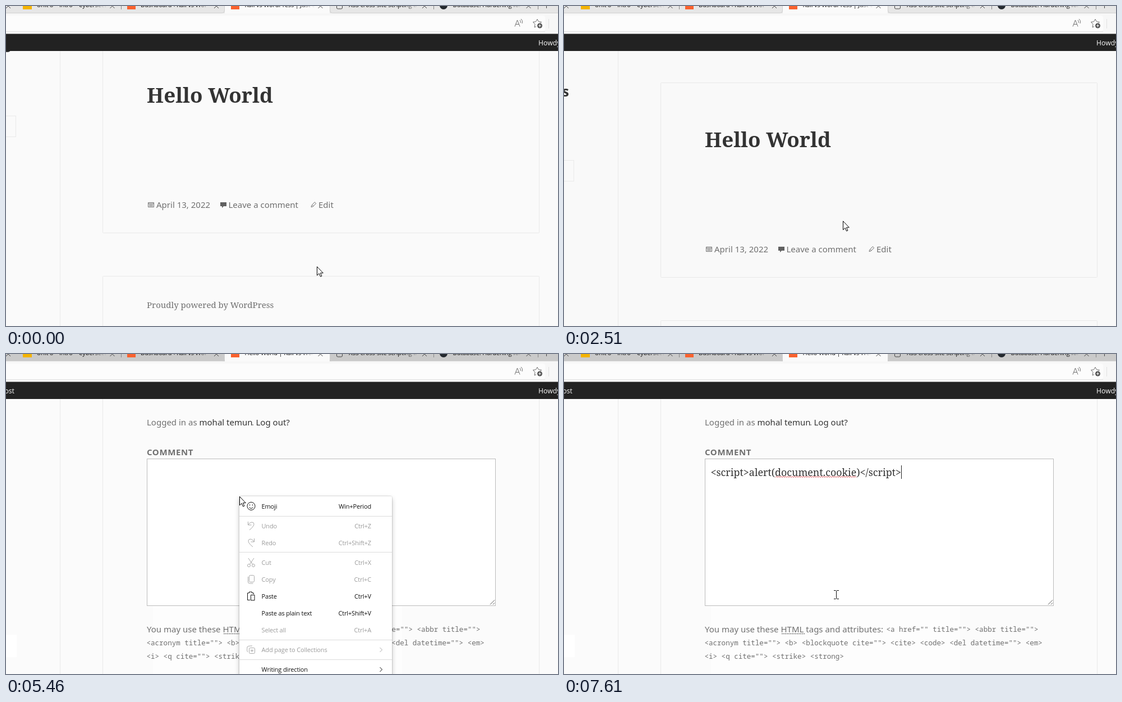
Write an HTML page that moves like this. It is 984 by 569 pixels and loops after 8000 ms.

```html
<!DOCTYPE html>
<html lang="en">
<head>
<meta charset="utf-8">
<title>Comment form</title>
<style>
  html, body { margin: 0; width: 100%; height: 100%; overflow: hidden; background: #fafafa; }
  svg { display: block; width: 984px; height: 569px; --paper: #fafafa; --tab: #e6e6e6; --rule: #e9e9e9; }
  text { white-space: pre; }
  .paper { fill: var(--paper); }
  .tab { fill: var(--tab); }
  .rule { fill: none; stroke: var(--rule); }
  .sans { font: 15px "Noto Sans", sans-serif; fill: #707070; }
  .serif { font: 15px "Noto Serif", serif; fill: #707070; }
  .mono { font: 12.56px "Noto Sans Mono", monospace; fill: #707070; }
  .title { font: bold 36.8px "Noto Serif", serif; fill: #333; }
  .site { font: bold 25px "Noto Sans", sans-serif; fill: #333; }
  .label { font-weight: bold; letter-spacing: .04em; }
  .link { fill: #333; }
  .typed { font: 17.9px "Noto Serif", serif; fill: #333; }
  .bar { font: 12.2px "Noto Sans", sans-serif; fill: #eee; }
  .ui { font: 11px "Open Sans", sans-serif; letter-spacing: -.15px; fill: #111; }
  .off { fill: #9c9c9c; }
  .line { fill: none; stroke: #444; }
  .dark { fill: none; stroke: #111; }
  .mid { fill: none; stroke: #707070; }
  .pale { fill: none; stroke: #aaa; }
  .pointer { fill: #fff; stroke: #000; stroke-linejoin: round; }
</style>
</head>
<body>
<svg viewBox="0 0 984 569">
  <defs>
    <linearGradient id="fade">
      <stop stop-color="var(--tab)" stop-opacity="0"/>
      <stop offset="1" stop-color="var(--tab)"/>
    </linearGradient>
    <linearGradient id="fadeActive">
      <stop stop-color="#fafafa" stop-opacity="0"/>
      <stop offset="1" stop-color="#fafafa"/>
    </linearGradient>
    <filter id="shadow" x="-10%" y="-10%" width="120%" height="120%">
      <feDropShadow dx="0" dy="0" stdDeviation="1" flood-opacity=".3"/>
      <feDropShadow dx="0" dy="4" stdDeviation="4" flood-opacity=".22"/>
    </filter>
  </defs>

  <rect class="paper" width="984" height="569"/>

  <g id="shade">
    <path fill="#fff" d="M0 80h96v420H0z"/>
    <path fill="#f1f1f1" d="M97 80h854v420H97z"/>
    <path fill="#fff" d="M173 80h778v21H173z"/>
    <path fill="#f7f7f7" d="M173 101h778v288H173z"/>
  </g>
  <g id="tail">
    <rect width="96" fill="#fff"/>
    <rect x="97" width="854" fill="#f1f1f1"/>
  </g>
  <path class="rule" d="M96.5 80V569"/>

  <g id="posts">
    <text class="site" x="9" y="82" text-anchor="end">s</text>
    <rect class="rule" x="-20.5" y="195.5" width="38" height="37"/>
    <rect class="rule" x="172.5" y="57.5" width="778" height="346" rx="1"/>
    <rect class="rule" x="172.5" y="480.5" width="778" height="101" rx="1"/>
    <text class="title" x="251" y="172">Hello World</text>
    <g class="mid">
      <path d="M253.5 349.5h10v8h-10zM253 351.5h11M255 353.5h7M255 355.5h7"/>
      <path d="M544 357.5l.8-3 5.5-5.8 2.4 2.3-5.6 5.7zM546 354l2 2"/>
      <path d="M382 349h11v7h-5l-3 3v-3h-3z" fill="#606060" stroke="none"/>
    </g>
    <text class="sans" y="359"><tspan x="268">April 13, 2022</tspan><tspan x="396.5">Leave a comment</tspan><tspan x="557">Edit</tspan></text>
    <text class="serif" x="251" y="537">Proudly powered by WordPress</text>
  </g>

  <g id="form">
    <path class="rule" d="M172.5 60V569M950.5 60V569"/>
    <path class="rule" d="M0 500.5H18M0 538.5H18"/>
    <rect id="search" y="499" width="19" height="40" fill="#fff"/>
    <rect id="patch" x="262" y="448" width="444" height="121" fill="#fdfdfd"/>
    <text class="sans" y="127"><tspan x="251">Logged in as </tspan><tspan class="link">mohal temun</tspan><tspan x="438">. </tspan><tspan class="link" x="445.5">Log out?</tspan></text>
    <text class="sans label" x="251" y="180">COMMENT</text>
    <rect id="area" x="251.5" y="186.5" width="621" height="261"/>
    <path class="line" d="M863 445.5l8-8M868 445.5l3-3" stroke-width=".9"/>
    <text class="sans" x="251" y="495">You may use these HTML tags and attributes:</text>
    <path class="line" d="M388 497.5h41" stroke-dasharray="2 1"/>
    <text class="mono"><tspan x="574.5" y="494">&lt;a href="" title=""&gt; &lt;abbr title=""&gt;</tspan><tspan x="250.5" y="518">&lt;acronym title=""&gt; &lt;b&gt; &lt;blockquote cite=""&gt; &lt;cite&gt; &lt;code&gt; &lt;del datetime=""&gt; &lt;em&gt;</tspan><tspan x="250.5" y="541.5">&lt;i&gt; &lt;q cite=""&gt; &lt;strike&gt; &lt;strong&gt;</tspan></text>
    <g id="typed">
      <text class="typed" x="261.5" y="217">&lt;script&gt;alert(document.cookie)&lt;/script&gt;</text>
      <path id="squiggle" fill="none" stroke="#e0494d"/>
    </g>
    <rect id="caret" y="198" width="1" height="24" fill="#222"/>
  </g>

  <g id="menu">
    <rect x="416" y="253" width="272" height="340" rx="3" fill="#fff" filter="url(#shadow)"/>
    <path d="M416 288.5h272M416 352.5h272M416 508.5h272M416 543.5h272" stroke="#dcdcdc"/>
    <g class="dark">
      <circle cx="437" cy="270.5" r="7"/>
      <path d="M433.5 272.5q3.5 4 7 0M434.5 267.5v2M439.5 267.5v2"/>
      <path d="M435 437.5h-4.5V425h3v-2h5v2h3v2M436.5 428.5h6.5v9.5h-6.5z"/>
      <path d="M666.5 557l4 4-4 4"/>
    </g>
    <g class="pale">
      <path d="M431.5 298v6h6M431.5 304q5-7 9.5-4 4 4-7 13"/>
      <path d="M442.5 328v6h-6M442.5 334q-5-7-9.5-4-4 4 7 13"/>
      <path d="M432 363l7.5 11M442 363l-7.5 11"/>
      <circle cx="433" cy="376" r="2.5"/><circle cx="441" cy="376" r="2.5"/>
      <rect x="433.5" y="393.5" width="9" height="12" rx="2"/>
      <path d="M431.5 396v9q0 3 3 3h6"/>
      <rect x="433.5" y="522.5" width="10" height="10" rx="2"/>
      <path d="M438.5 525v5M436 527.5h5M431 530q-2-1-1-9 0-2 9-2M666.5 522l4 4-4 4"/>
    </g>
  </g>

  <g id="chrome">
    <rect width="984" height="50" fill="#f7f7f7"/>
    <rect class="tab" width="984" height="13"/>
    <path d="M390 0h187v13H390z" fill="#fafafa"/>
    <path d="M389.5 0v8q0 4-4 4.5H0M577.5 0v8q0 4 4 4.5H984" fill="none" stroke="#d0d0d0"/>
    <path d="M0 17h957q4 0 4 4v20q0 4-4 4H0z" fill="#fcfcfc"/>
    <path d="M0 45.5h961M967.5 23v17" stroke="#e2e2e2"/>
    <path d="M205.5 0v6M762.5 0v6M948.5 0v6" stroke="#888"/>
    <path d="M30 0h16v6H30z" fill="#f4b400"/>
    <path d="M216 0h15v6h-15zM401 0h15v6h-15z" fill="#f9622f"/>
    <path class="line" d="M589.5 0v3q0 2 2 2h6q2 0 2-2V0"/>
    <circle cx="780" cy="-1" r="7" fill="#24292f"/>
    <g id="tabs"></g>
    <path class="line" d="M963.5 0v4"/>
    <g class="mid">
      <path d="M907 36.5l4.5-11.5 4.5 11.5M908.5 32.5h6M916 25q2 2 1 5M918 23q4 3 2 8"/>
      <path d="M945 36.5l-3 1.5 1-5.5-3.5-4 5-.7 2.5-4.3 2.5 4.3 5 .7-2 2"/>
    </g>
    <circle cx="951.5" cy="35" r="4.5" fill="#555"/>
    <path d="M949 35h5M951.5 32.5v5" stroke="#fff"/>
    <rect y="49.5" width="984" height="30.5" fill="#222"/>
    <text id="editPost" class="bar" x="15" y="69.5" text-anchor="end">Edit Post</text>
    <text class="bar" x="949" y="69.5">Howdy,</text>
  </g>

  <g id="cursor">
    <path id="arrow" class="pointer" d="M.5.5v15.5l3.6-3.4 2.5 5.6 2.3-1-2.4-5.4h4.8z"/>
    <path id="hand" class="pointer" d="M4.5 14V2.3q0-1.8 1.5-1.8t1.5 1.8V9V7.5q2.5-1 3 1 2-.7 2.5 1 2-.3 2.2 1.5V17q-.5 2-1.7 3.5v2h-7v-2Q3 17 .7 13.5q-.6-2.5 1.3-2z"/>
    <path id="beam" d="M0 .5h3.5l1 1 1-1H9M4.5 1v14M0 15.5h3.5l1-1 1 1H9" fill="none" stroke="#111"/>
  </g>
</svg>

<script>
  const LOOP = 8000;
  const $ = id => document.getElementById(id);
  const svg = document.querySelector('svg');
  const show = (id, on) => { $(id).style.display = on ? '' : 'none'; };
  // Last entry of a [time, ...values] track that has begun.
  const at = (track, t) => track.findLast(step => step[0] <= t).slice(1);

  function add(parent, tag, attrs, text = '') {
    const node = document.createElementNS('http://www.w3.org/2000/svg', tag);
    for (const key in attrs) node.setAttribute(key, attrs[key]);
    node.textContent = text;
    return parent.appendChild(node);
  }

  const titles = ['', 'Unit 8 – Intro – Cybersecu', 'Dashboard ‹ Kali vs Wor', 'Kali vs WordPress | Just a',
    'XSS cross-site scripting a', 'Database: Hardening for'];
  const tabText = titles.map((title, i) => {
    const right = 4 + i * 185.5, active = i === 3;
    const label = add($('tabs'), 'text', { class: 'ui', x: right - 135, y: 2 }, title);
    add($('tabs'), 'rect', { x: right - 34, width: 22, height: 8, fill: active ? 'url(#fadeActive)' : 'url(#fade)' });
    add($('tabs'), 'rect', { x: right - 12, width: 8, height: 8, fill: active ? '#fafafa' : 'var(--tab)' });
    add($('tabs'), 'path', { class: 'line', d: `M${right - 4}-4l8 8m0-8l-8 8` });
    return label;
  });

  const menuItems = [
    [271, 'Emoji', 'Win+Period', true], [306, 'Undo', 'Ctrl+Z'], [336, 'Redo', 'Ctrl+Shift+Z'],
    [371, 'Cut', 'Ctrl+X'], [401, 'Copy', 'Ctrl+C'], [431, 'Paste', 'Ctrl+V', true],
    [461, 'Paste as plain text', 'Ctrl+Shift+V', true], [491, 'Select all', 'Ctrl+A'],
    [526, 'Add page to Collections', ''], [561, 'Writing direction', '', true]
  ];
  for (const [y, name, keys, enabled] of menuItems) {
    const cls = enabled ? 'ui' : 'ui off';
    add($('menu'), 'text', { class: cls, x: 455.5, y: y + 4 }, name);
    add($('menu'), 'text', { class: cls, x: 651, y: y + 4, 'text-anchor': 'end' }, keys);
  }
  $('squiggle').setAttribute('d', 'M377 219.5' + 'l2-2l2 2'.repeat(36));

  const scroll = [[0, 0], [400, -8], [520, -41], [650, -201], [1030, -130], [1150, -50], [1270, -1],
    [1390, -150], [1540, -201], [1660, -88], [1780, -30], [1900, -8], [2020, -2], [2390, 16],
    [2510, 79], [2660, 89], [2780, 92]];
  const settle = [[0, 18], [3540, 8], [3660, 2], [3780, 0]];
  const tailEnd = [[0, 0], [1030, 500], [1150, 0], [1390, 540], [1780, 0]];
  const caret = [[0, 0], [4940, 262], [5460, 0], [6090, 262], [6390, 601], [7060, 0], [7610, 601]];
  const paper = [[0, '#fafafa'], [2390, '#f9f9f9'], [3420, '#fbfbfb']];
  const cursor = [[0, 'arrow', 554, 463], [1540, 'arrow', 554, 460], [2390, 'arrow', 530, 425],
    [2510, 'arrow', 497, 382], [2660, 'arrow', 489, 405], [2780, 'hand', 477, 433],
    [4270, 'beam', 440, 290], [4390, 'beam', 418, 255], [4540, 'beam', 415, 247],
    [5460, 'arrow', 416, 253], [5580, 'arrow', 440, 310], [5700, 'arrow', 465, 372],
    [5820, 'arrow', 475, 403], [5940, 'arrow', 481, 420], [6090, 'arrow', 483, 440],
    [6240, 'arrow', 483, 429], [6510, 'beam', 483, 420], [7060, 'beam', 481, 420]];

  function draw(t) {
    const onForm = t >= 3420, focused = t >= 4940;
    svg.style.setProperty('--paper', at(paper, t)[0]);
    svg.style.setProperty('--tab', onForm ? '#cacaca' : '#e6e6e6');
    tabText[3].textContent = onForm ? 'Hello World | Kali vs Wor' : titles[3];

    show('posts', !onForm);
    show('form', onForm);
    show('editPost', onForm);
    show('shade', t >= 650 && t < 1030);
    show('search', t >= 4020);
    show('patch', t >= 5460);
    show('menu', t >= 5460 && t < 6390);
    show('typed', t >= 6390);

    const [y] = at(scroll, t);
    $('posts').setAttribute('transform', `translate(0 ${y})`);
    $('form').setAttribute('transform', `translate(0 ${at(settle, t)[0]})`);
    for (const rect of $('tail').children) {
      rect.setAttribute('y', 582 + y);
      rect.setAttribute('height', Math.max(0, at(tailEnd, t)[0] - 582 - y));
    }

    $('area').setAttribute('fill', focused ? '#fff' : '#fbfbfb');
    $('area').setAttribute('stroke', focused ? '#bcbcbc' : '#e6e6e6');
    const [caretX] = at(caret, t);
    show('caret', caretX);
    $('caret').setAttribute('x', caretX);

    const [kind, cx, cy] = at(cursor, t);
    for (const id of ['arrow', 'hand', 'beam']) show(id, id === kind);
    $('cursor').setAttribute('transform', `translate(${cx} ${cy})`);
  }

  const start = performance.now();
  function tick() {
    draw((performance.now() - start) % LOOP);
    requestAnimationFrame(tick);
  }
  tick();
</script>
</body>
</html>
```
